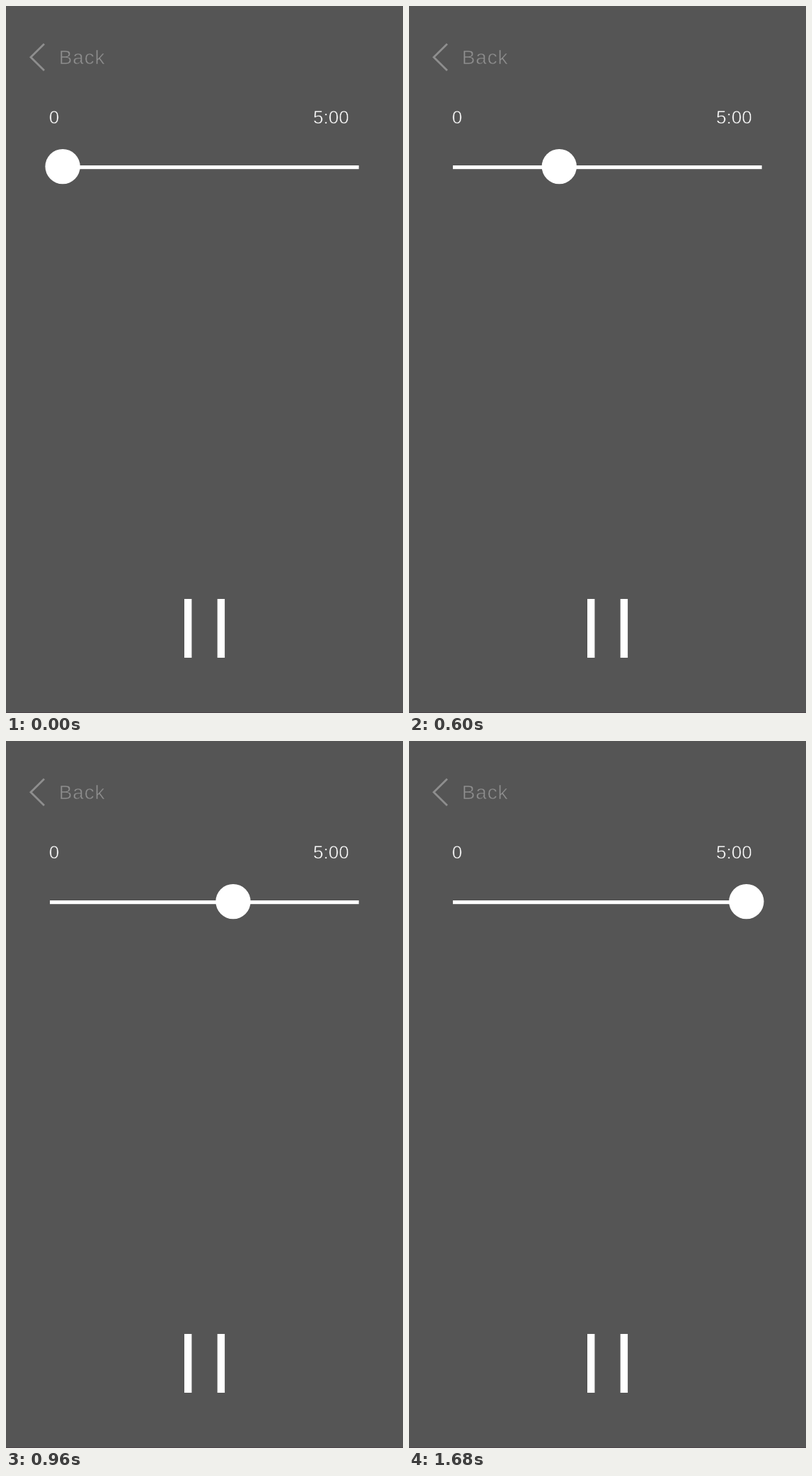
Write an HTML page that moves like this. It is 561 px wide and 998 px high and loops after 1.71 s.

```html
<!DOCTYPE html>
<html lang="en">
<head>
<meta charset="utf-8">
<title>Player</title>
<style>
  html, body { margin: 0; height: 100%; overflow: hidden; background: #555; }
  svg { display: block; width: 561px; height: 998px; }
  /* a thin background-coloured outline slims the letters to a light weight */
  text { font: 26px "Liberation Sans", Arial, sans-serif; stroke: #555; stroke-width: .6px; }
  .back { font-size: 28px; letter-spacing: .8px; fill: #8e8e8e; }
</style>
</head>
<body>
<svg viewBox="0 0 561 998" fill="#fff">
  <path d="M54 53.5 35 72.3 54 91" fill="none" stroke="#8e8e8e" stroke-width="2.8"/>
  <text class="back" x="74.8" y="82">Back</text>
  <text x="60.8" y="166">0</text>
  <text x="434" y="166">5:00</text>
  <rect x="62" y="225" width="436.6" height="5.2"/>
  <circle id="knob" cy="226.6" r="24.7"/>
  <rect x="252" y="837" width="10.4" height="83"/>
  <rect x="298.7" y="837" width="10.4" height="83"/>
  <rect y="997" width="561" height="1" fill="#4b444a"/>
</svg>
<script>
  const LOOP = 1710, STEP = 30;
  const LEAD = 210, GLIDE = 2040; // the loop shows the middle part of a longer glide
  const FROM = 67.8, TO = 483.2;
  const knob = document.getElementById('knob');
  const smooth = p => p * p * (3 - 2 * p);
  const start = performance.now();

  function draw() {
    const t = (performance.now() - start) % LOOP;
    const held = Math.floor(t / STEP) * STEP;
    knob.setAttribute('cx', FROM + (TO - FROM) * smooth((held + LEAD) / GLIDE));
    requestAnimationFrame(draw);
  }
  draw();
</script>
</body>
</html>
```
